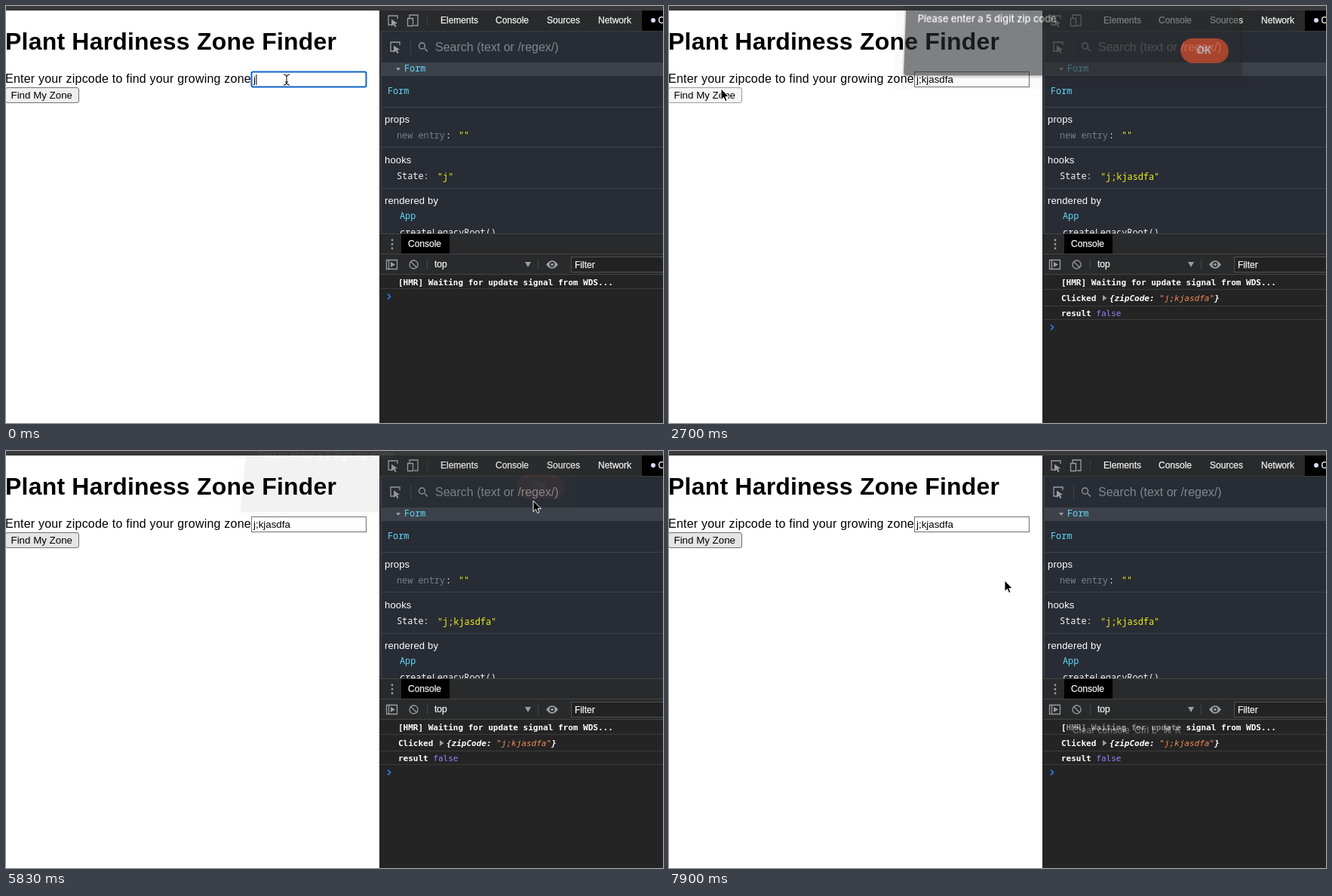
These frames come from a looping animation (871x554 px, 8000 ms). An HTML page:

```html
<!DOCTYPE html>
<html lang="en">
<head>
<meta charset="utf-8">
<title>Zone finder</title>
<style>
  html, body { margin: 0; width: 100%; height: 100%; overflow: hidden; background: #fff; }
  #stage { position: relative; width: 871px; height: 554px; overflow: hidden; background: #fff; }
  svg { position: absolute; left: 0; top: 0; overflow: visible; }
  text { font-family: "Liberation Sans", Arial, sans-serif; font-size: 12px; white-space: pre; }
  .h1 { font-size: 32px; font-weight: bold; letter-spacing: .2px; }
  .label { font-size: 16px; letter-spacing: .21px; }
  .field { font-size: 13.33px; }
  .ui { fill: #f2f2f2; stroke: #f2f2f2; stroke-width: .25px; }
  .head { font-size: 13px; fill: #fff; letter-spacing: .15px; }
  .search { font-size: 16px; fill: #82868c; }
  .code { font-family: "Noto Sans Mono", monospace; font-size: 11.85px; fill: #f4f4f4; }
  .comp { fill: #61dafb; }
  .dim { fill: #777d88; }
  .str { fill: #f0f01c; }
  .log { font-family: "DejaVu Sans Mono", monospace; font-size: 11px; font-weight: bold; fill: #fff; }
  .obj { font-style: italic; }
  .tip { font-size: 12px; letter-spacing: .2px; fill: #d0d0d0; }
  .line { stroke: #3d4149; fill: none; }
  .rule { stroke: #3c3c3c; fill: none; }
  .icon { stroke: #9a9da1; fill: none; stroke-width: 1.3; }
  .solid { fill: #9a9da1; }
  #dialog { left: 298px; top: -30px; transform-origin: 237px 130px; }
  #dialog text { font-family: Inter, sans-serif; font-size: 13px; font-weight: 500; fill: #fff; }
  #dialog .title { font-size: 15px; font-weight: 600; }
  #dialog .ok { font-weight: 700; text-anchor: middle; }
</style>
</head>
<body>
<div id="stage">
<svg width="871" height="554" viewBox="0 0 871 554">
  <defs>
    <g id="pick">
      <path class="icon" d="M5 12H1V0H13V4"/>
      <path class="solid" d="M5 4.500V14L7.600 11.700 10 15.200 11.600 14 9.400 10.700 13 10Z"/>
    </g>
  </defs>

  <text class="h1" x="-1" y="58">Plant Hardiness Zone Finder</text>
  <text class="label" x="-1" y="102">Enter your zipcode to find your growing zone</text>
  <rect id="box" x="325.500" y="87.500" width="152" height="20" fill="#fff"/>
  <text id="typed" class="field" x="328" y="102"></text>
  <rect id="caret" y="91" width="1" height="14"/>
  <rect id="btn" x="-.5" y="108.500" width="97" height="20" rx="2.500"/>
  <text class="field" x="6.500" y="123">Find My Zone</text>

  <rect width="871" height="6" fill="#3a3a3c"/>
  <rect x="495" y="6" width="376" height="548" fill="#242424"/>
  <rect x="496" y="6" width="375" height="27" fill="#292a2b"/>
  <path class="rule" d="M496 33.500H871M558.500 12V27"/>
  <use href="#pick" x="506" y="13"/>
  <path class="icon" d="M535 16V12H546V26H541M532.500 16.500H539.500V26.500H532.500Z"/>
  <rect x="843" y="6" width="28" height="27" fill="#000"/>
  <text class="ui" x="576" y="23">Elements</text>
  <text class="ui" x="649" y="23">Console</text>
  <text class="ui" x="717" y="23">Sources</text>
  <text class="ui" x="785" y="23">Network</text>
  <circle cx="858" cy="19" r="3" fill="#d3dcf7"/>
  <text class="ui" x="864.500" y="23">C</text>

  <rect x="496" y="34" width="375" height="268" fill="#282c34"/>
  <rect x="496" y="34" width="2" height="268" fill="#3a3e45"/>
  <use href="#pick" x="509" y="48"/>
  <path class="line" d="M536.500 45V65"/>
  <path class="icon" d="M555 56.500 559 60.500"/>
  <circle class="icon" cx="551.500" cy="53" r="4"/>
  <text class="search" x="569" y="60">Search (text or /regex/)</text>
  <rect x="498" y="75" width="373" height="18" fill="#3d424a"/>
  <path class="solid" d="M517 82H523L520 86Z"/>
  <text class="code comp" x="528" y="87">Form</text>
  <text class="code comp" x="506" y="117">Form</text>
  <path class="line" d="M498 134.500H871M498 187.500H871M498 242.500H871"/>
  <text class="head" x="502" y="155">props</text>
  <text class="code dim" x="518" y="176">new entry</text>
  <text class="code" x="583" y="176">:</text>
  <text class="code str" x="600" y="176">""</text>
  <text class="head" x="502" y="209">hooks</text>
  <text class="code" x="518" y="230">State:</text>
  <text id="state" class="code str" x="572" y="231"></text>
  <text class="head" x="502" y="263">rendered by</text>
  <text class="code comp" x="522" y="283">App</text>
  <text class="code" x="522" y="305">createLegacyRoot()</text>

  <rect x="496" y="302" width="375" height="55" fill="#292a2b"/>
  <path class="rule" d="M496 302.500H871M496 329.500H871M496 356.500H871M558.500 336V350M705.500 336V350" style="stroke:#444"/>
  <g class="solid"><circle cx="512" cy="311" r="1.400"/><circle cx="512" cy="316.500" r="1.400"/><circle cx="512" cy="322" r="1.400"/></g>
  <rect x="524" y="303" width="64" height="26" fill="#000"/>
  <text class="ui" x="533" y="320">Console</text>
  <path class="icon" d="M504.500 337.500H518.500V349.500H504.500ZM507.500 337V350"/>
  <path class="solid" d="M510 340V347L516 343.500Z"/>
  <circle class="icon" cx="540.500" cy="343.500" r="5.500" stroke-width="1.600"/>
  <path class="icon" d="M536.500 339.500 544.500 347.500"/>
  <text class="ui" x="568" y="347">top</text>
  <path class="solid" d="M688 340H696L692 347Z"/>
  <path class="solid" d="M716 343.500Q724 333 732 343.500Q724 354 716 343.500Z"/>
  <circle cx="724" cy="343.500" r="3.400" fill="#292a2b"/>
  <circle class="solid" cx="724" cy="343.500" r="1.800"/>
  <rect x="749.500" y="333.500" width="130" height="20" fill="#222" stroke="#505050"/>
  <text class="ui" x="754" y="348">Filter</text>

  <text class="log" x="520" y="371">[HMR] Waiting for update signal from WDS...</text>
  <path id="rule" class="rule" d="M496 375.500H871"/>
  <g id="logs">
    <path class="rule" d="M496 376.500H871M496 398.500H871M496 416.500H871"/>
    <text class="log" x="520" y="392">Clicked</text>
    <path class="solid" d="M575 384V392L580.500 388Z"/>
    <text class="log obj" x="584" y="392">{zipCode: <tspan fill="#f28b54" font-weight="400">"j;kjasdfa"</tspan>}</text>
    <text class="log" x="520" y="412">result <tspan fill="#9980ff" font-weight="400">false</tspan></text>
  </g>
  <path id="prompt" d="M506 382.500 509.500 386 506 389.500" fill="none" stroke="#367cf1" stroke-width="1.600"/>

  <g id="tipTop" opacity=".55">
    <rect x="565" y="361" width="141" height="20" rx="2" fill="#2b2b2b"/>
    <text class="tip" x="572" y="375">JavaScript context: top</text>
  </g>
  <g id="tipClear" opacity=".55">
    <rect x="527" y="361" width="157" height="20" rx="2" fill="#2b2b2b"/>
    <text class="tip" x="535" y="375">Clear console</text>
    <text class="tip" x="617" y="375">Ctrl L</text>
    <text class="tip" x="655" y="375">⌘ K</text>
  </g>
</svg>

<svg id="dialog" width="474" height="147">
  <rect width="474" height="147" fill="#000" opacity=".03"/>
  <rect x="11" y="0" width="452" height="133" rx="6" fill="#000" opacity=".18"/>
  <rect x="13" y="0" width="448" height="130" rx="4" fill="#292a2d"/>
  <text class="title" x="29" y="32">192.168.2.78:3000 says</text>
  <text x="29" y="61">Please enter a 5 digit zip code</text>
  <rect id="ok" x="381" y="82" width="64" height="32" rx="16"/>
  <text class="ok" x="412.500" y="102.500">OK</text>
</svg>

<svg width="871" height="554">
  <path id="arrow" d="M0 0V14.500L3.400 11.400 5.700 16.600 8 15.600 5.900 10.600H10.300Z" stroke="#fff"/>
  <g id="beam" fill="none">
    <path d="M-4-7Q0-7 0-4Q0-7 4-7M0-4V4M-4 7Q0 7 0 4Q0 7 4 7M-2 3H2" stroke="#fff" stroke-opacity=".55" stroke-width="2.200"/>
    <path d="M-4-7Q0-7 0-4Q0-7 4-7M0-4V4M-4 7Q0 7 0 4Q0 7 4 7M-2 3H2" stroke="#000"/>
  </g>
</svg>
</div>

<script>
const LOOP = 8000;
const $ = id => document.getElementById(id);

// [start ms, value] tables, each value held until the next
const typing = [[0, 1], [150, 2], [300, 3], [450, 5], [600, 6], [750, 7], [900, 9]];
const blink = [[0, 1], [1350, 0], [1800, 1], [2250, 0]];
const button = [[0, '#efefef'], [1350, '#e5e5e5'], [2550, '#f5f5f5'], [5830, '#e5e5e5']];
// [opacity, tilt amount]
const alertBox = [[0, [0, 0]], [2700, [.6, .4]], [2840, [1, 0]], [5830, [.065, 1]], [5980, [0, 0]]];
// [x, y, is text beam]
const mouse = [
  [0, [372, 98, 1]], [1050, [208, 98, 1]], [1200, [122, 116]], [1350, [76, 124]], [1500, [70, 115]], [1650, [69, 110]],
  [3440, [146, 106]], [3590, [232, 98]], [3740, [314, 82]], [3890, [392, 64]], [4040, [462, 48]],
  [4180, [520, 38]], [4330, [545, 36]],
  [4630, [576, 42]], [4780, [632, 54]], [4930, [676, 62]], [5080, [694, 65]], [5230, [699, 66]],
  [5980, [694, 92]], [6120, [668, 152]], [6270, [631, 231, 1]], [6410, [588, 332]], [6560, [545, 390]], [6710, [541, 399]],
  [7010, [550, 404]], [7160, [568, 408]], [7310, [586, 411]], [7460, [596, 412]],
  [7760, [541, 342]], [7900, [445, 172]]
];

const at = (table, t) => table.findLast(step => step[0] <= t)[1];
const show = (id, on) => $(id).style.display = on ? '' : 'none';
const set = (id, attrs) => { for (const k in attrs) $(id).setAttribute(k, attrs[k]); };

function draw(t) {
  const word = 'j;kjasdfa'.slice(0, at(typing, t));
  $('typed').textContent = word;
  $('state').textContent = `"${word}"`;

  const focused = t < 2550;
  set('box', focused
    ? { stroke: '#0c63c6', 'stroke-width': 2, rx: 2 }
    : { stroke: '#6f6f6f', 'stroke-width': 1, rx: 0 });
  set('caret', { x: 328.5 + $('typed').getComputedTextLength() });
  show('caret', focused && at(blink, t));
  set('btn', { fill: at(button, t), stroke: t >= 2550 && t < 5830 ? '#9a9a9a' : '#707070' });

  const logged = t >= 2700;
  show('logs', logged);
  show('rule', !logged);
  set('prompt', { transform: `translate(0 ${logged ? 41 : 0})` });
  show('tipTop', t >= 6560 && t < 6710);
  show('tipClear', t >= 7900);

  const [alpha, tilt] = at(alertBox, t);
  const dialog = $('dialog').style;
  dialog.opacity = alpha;
  dialog.transform = tilt
    ? `translateY(${-19 * tilt}px) perspective(800px) rotateX(${19 * tilt}deg) scaleY(${1 + .12 * tilt})`
    : 'none';
  set('ok', { fill: t >= 4930 ? '#ff6a45' : '#fb542b' });

  const [x, y, beam] = at(mouse, t);
  show('arrow', !beam);
  show('beam', beam);
  set(beam ? 'beam' : 'arrow', { transform: `translate(${x} ${y})` });
}

function tick() {
  draw(performance.now() % LOOP);
  requestAnimationFrame(tick);
}
tick();
</script>
</body>
</html>
```
